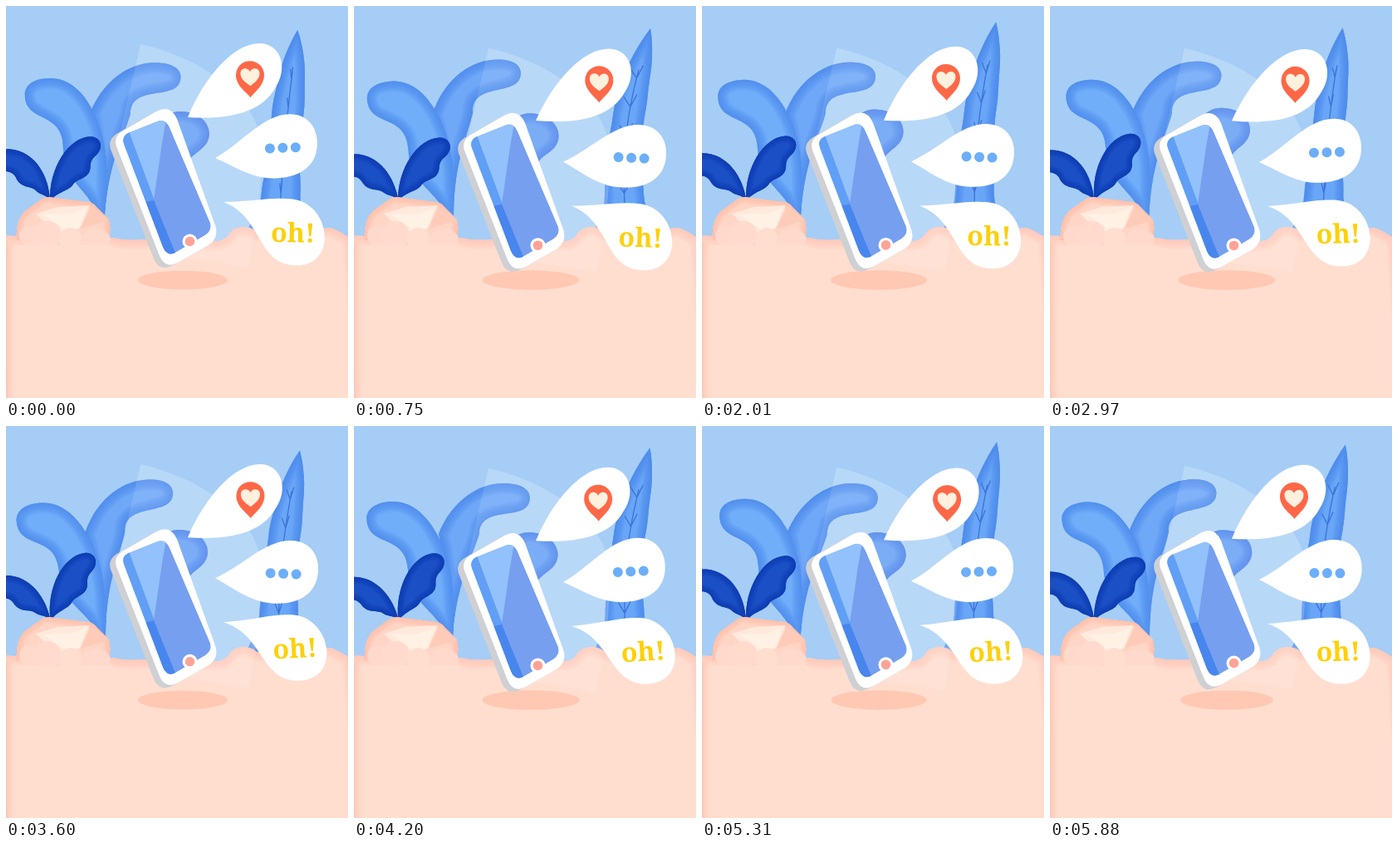
Animation, 412 px wide and 472 px high, one loop 5.91 s. Source, as an HTML page with a canvas:

```html
<!DOCTYPE html>
<html lang="en">
<head>
<meta charset="utf-8">
<title>Floating phone</title>
<style>
html, body { margin: 0; width: 100%; height: 100%; overflow: hidden; background: #a5cdf6; }
canvas { display: block; width: 412px; height: 472px; }
</style>
</head>
<body>
<canvas id="stage" width="412" height="472"></canvas>
<script>
const ctx = document.getElementById('stage').getContext('2d');
const LOOP = 5910, STEP = 30;

// Harmonic motion around a middle value, highest at the peak time.
const sway = (mid, amp, period, peak = 0) =>
  t => mid + amp * Math.cos(2 * Math.PI * (t - peak) / period);

const move = {
  bob: sway(2.65, -2.65, 1228),
  leftLobe: sway(-3.4, 2.4, 2500),
  rightLobe: sway(-2.4, 2.4, 1030, 118),
  lowLobe: sway(0.5, 2, 4020, 750),
  darkLeft: sway(-6, 5.5, 2680),
  darkRight: sway(-4, -3.5, 5600, 3700),
  treeLean: sway(0.6, -0.42, 1610),
  treeTop: sway(24.5, -5, 3350, 1900),
  heart: sway(0.3, 0.9, 2000, 970),
  dots: sway(1.9, 2.8, 1345, 790),
  word: sway(-2.9, -2.6, 7000, 4400)
};

const shape = {
  leftLobe: new Path2D('M116 264 C100 215 70 215 70 170 C71 125 25 140 25 106 C25 92 38 86 55 86 ' +
    'C100 86 122 150 122 195 C122 225 119 250 116 264Z'),
  rightLobe: new Path2D('M110 264 C112 200 112 170 102 130 C118 90 150 69 180 69 C204 69 212 78 212 86 ' +
    'C212 118 152 92 151 130 C142 160 122 190 118 264Z'),
  lowLobe: new Path2D('M170 200 C170 150 185 125 208 125 C232 125 244 140 243 153 C241 175 215 172 215 200Z'),
  darkLeft: new Path2D('M53 234 C52 205 36 175 6 172 C-12 171 -20 182 -18 192 C-8 202 6 194 12 206 ' +
    'C18 220 30 216 36 222 C42 228 48 226 53 234Z'),
  darkRight: new Path2D('M53 234 C53 195 78 159 104 159 C113 159 118 166 116 173 C113 184 104 182 103 195 ' +
    'C102 210 88 208 82 215 C76 224 66 222 53 234Z'),
  sand: new Path2D('M-20 279 Q8 274 22 279 H128 Q145 283 165 281 L250 283 Q262 284 267 277 ' +
    'Q274 265 288 266 Q297 267 302 272 L372 275 Q382 264 394 268 Q404 272 416 281 L432 500 H-20Z'),
  rock: new Path2D('M13 282 Q11 257 24 246 L42 233 Q49 228 58 231 L99 236 Q106 237 110 243 L123 256 Q127 262 124 282Z'),
  beam: new Path2D('M162 46 C235 62 303 110 307 165 C310 220 301 270 292 315 L195 300 L138 150Z'),
  face: new Path2D('M133 169 Q129 156 143 149 L181 127 Q198 118 206 136 L252 264 Q257 279 244 288 L207 309 Q192 317 185 301Z'),
  screen: new Path2D('M142 166 Q139 157 147 153 L182 139 Q192 135 197 146 L246 261 Q249 270 240 276 L204 297 Q194 302 189 290Z'),
  heartBubble: new Path2D('M219 134 C240 85 275 46 306 46 C332 46 341 76 325 99 C307 132 262 137 219 134Z'),
  dotBubble: new Path2D('M252 183 C285 165 310 131 342 131 C366 131 376 150 375 168 C374 195 352 208 322 208 C295 208 275 193 252 183Z'),
  wordBubble: new Path2D('M262 236 C300 236 320 231 345 234 C368 237 383 258 383 280 C383 300 370 314 350 314 C300 314 310 255 262 236Z'),
  pin: new Path2D('M295 111 C291 105 277.5 97 277.5 84 A17 17 0 0 1 311.5 84 C311.5 97 299 105 295 111Z'),
  heart: new Path2D('M295 97 C289 93 283 89 283 82 C283 75 292 74 294.5 80 C297 74 306 75 306 82 C306 89 300 93 295 97Z')
};

function fill(path, color) {
  ctx.fillStyle = color;
  ctx.fill(path);
}

function disc(x, y, rx, color, ry = rx) {
  ctx.fillStyle = color;
  ctx.beginPath();
  ctx.ellipse(x, y, rx, ry, 0, 0, 2 * Math.PI);
  ctx.fill();
}

function poly(color, ...xy) {
  ctx.fillStyle = color;
  ctx.beginPath();
  for (let i = 0; i < xy.length; i += 2) ctx.lineTo(xy[i], xy[i + 1]);
  ctx.fill();
}

// Flat fill with a rim that fades inwards.
function shaded(path, color, rim, reach = 28) {
  fill(path, color);
  ctx.save();
  ctx.clip(path);
  ctx.strokeStyle = rim;
  ctx.globalAlpha = 0.13;
  for (let w = reach / 10; w <= reach; w += reach / 10) {
    ctx.lineWidth = w;
    ctx.stroke(path);
  }
  ctx.restore();
}

function turned(x, y, degrees, draw, dy = 0) {
  ctx.save();
  ctx.translate(x, y + dy);
  ctx.rotate(degrees * Math.PI / 180);
  ctx.translate(-x, -y);
  draw();
  ctx.restore();
}

// A tall leaf: u runs from the ground (0) to the tip (1).
function drawTree(t) {
  const lean = move.treeLean(t), height = 275 - move.treeTop(t);
  const mid = u => 328 + 22 * u + lean * (7 * u - 14 * Math.sin(Math.PI * u));
  const half = u => 20 * (1 - u ** 6) + 20 * (1 - u) ** 8 + Math.sin(32 * u) * (1 - u);
  const y = u => 275 - height * u;
  const leaf = new Path2D();
  const steps = 32;
  for (let i = -steps; i <= steps; i++) {
    const u = 1 - Math.abs(i) / steps;
    leaf.lineTo(mid(u) + Math.sign(i) * half(u), y(u));
  }
  leaf.closePath();
  shaded(leaf, '#69a6f7', '#4580e6', 22);

  ctx.strokeStyle = '#3c73d8';
  ctx.lineWidth = 1.3;
  ctx.beginPath();
  for (let u = 0; u < 0.84; u += 0.04) ctx.lineTo(mid(u), y(u));
  for (let u = 0.2; u < 0.8; u += 0.14) {
    ctx.moveTo(mid(u) - 8 * lean, y(u + 0.05));
    ctx.lineTo(mid(u), y(u));
    ctx.lineTo(mid(u) + 8 * lean, y(u + 0.06));
  }
  ctx.stroke();
}

function drawPlants(t) {
  turned(115, 235, move.lowLobe(t), () => shaded(shape.lowLobe, '#6ba3f5', '#477fe6'));
  turned(115, 235, move.rightLobe(t), () => shaded(shape.rightLobe, '#70a8f8', '#4a84e9'));
  turned(115, 235, move.leftLobe(t), () => shaded(shape.leftLobe, '#70aefa', '#4a85e8'));
  turned(53, 230, move.darkLeft(t), () => shaded(shape.darkLeft, '#1b4fc6', '#0e3aa9', 18));
  turned(53, 230, move.darkRight(t), () => shaded(shape.darkRight, '#1b4fc6', '#0e3aa9', 18));
}

function drawGround() {
  shaded(shape.sand, '#ffded0', '#ffc1ae', 26);
  const edge = ctx.createLinearGradient(0, 0, 14, 0);
  edge.addColorStop(0, '#ffc5b3');
  edge.addColorStop(1, '#ffded000');
  ctx.fillStyle = edge;
  ctx.fillRect(0, 284, 14, 188);

  shaded(shape.rock, '#ffd5c6', '#ffb8a3', 18);
  ctx.save();
  ctx.clip(shape.rock);
  poly('#ffe9dc', 36, 250, 62, 242, 101, 240, 89, 268, 60, 274);
  poly('#fff2e4', 45, 251, 78, 250, 97, 243, 89, 266, 76, 273);
  poly('#ffcbb9', 103, 240, 125, 258, 90, 268);
  ctx.restore();
  disc(29, 277, 13, '#ffd9cb');
  disc(50, 276, 17, '#ffdacd');
  disc(78, 281, 14, '#ffded0');
  disc(108, 282, 18, '#ffd9cb', 14);
  ctx.fillStyle = '#ffded0';
  ctx.fillRect(12, 288, 116, 12);
}

function drawBeam(bob) {
  turned(0, 0, 0, () => fill(shape.beam, 'rgba(255, 255, 255, 0.11)'), bob);
}

function drawPhone() {
  ctx.save();
  ctx.translate(-7, 3.5);
  for (let i = 0; i < 7; i++) {
    fill(shape.face, '#cfd0d3');
    ctx.translate(1, -0.5);
  }
  ctx.restore();
  fill(shape.face, '#fff');
  ctx.save();
  ctx.clip(shape.screen);
  fill(shape.screen, '#769ff0');
  poly('#92c1fb', 130, 130, 194, 130, 188, 165, 175, 254, 135, 160);
  poly('#609ff5', 135, 155, 147, 148, 204, 302, 190, 302);
  poly('#4886ee', 168, 236, 178, 234, 206, 302, 190, 302);
  ctx.restore();
  disc(221.5, 283.5, 9, '#fff');
  disc(221.5, 283.5, 5.8, '#ffa297');
}

function drawBubbles(t, bob) {
  turned(219, 134, move.heart(t), () => {
    fill(shape.heartBubble, '#fff');
    fill(shape.pin, '#ff6847');
    fill(shape.heart, '#fff1de');
  }, bob * 0.85);
  turned(252, 183, move.dots(t), () => {
    fill(shape.dotBubble, '#fff');
    for (let i = 0; i < 3; i++) disc(318 + 15.5 * i, 172 - 0.5 * i, 6, '#6caef9');
  }, bob);
  turned(262, 236, move.word(t), () => {
    fill(shape.wordBubble, '#fff');
    turned(345, 275, 2, () => {
      ctx.fillStyle = '#fdd00a';
      ctx.font = '900 32px "Noto Serif", serif';
      ctx.textAlign = 'center';
      ctx.fillText('oh!', 345, 286);
    });
  }, bob);
}

function draw(t) {
  const bob = move.bob(t);
  ctx.fillStyle = '#a5cdf6';
  ctx.fillRect(0, 0, 412, 472);
  drawTree(t);
  drawBeam(bob);
  drawPlants(t);
  drawGround();
  disc(213, 330, 54 + bob * 0.9, '#ffc8b2', 11.3 + bob * 0.1);
  drawBeam(bob);
  turned(0, 0, 0, drawPhone, bob);
  drawBubbles(t, bob);
}

const start = performance.now();
function tick() {
  const t = (performance.now() - start) % LOOP;
  draw(Math.floor(t / STEP) * STEP);
  requestAnimationFrame(tick);
}
tick();
</script>
</body>
</html>
```
